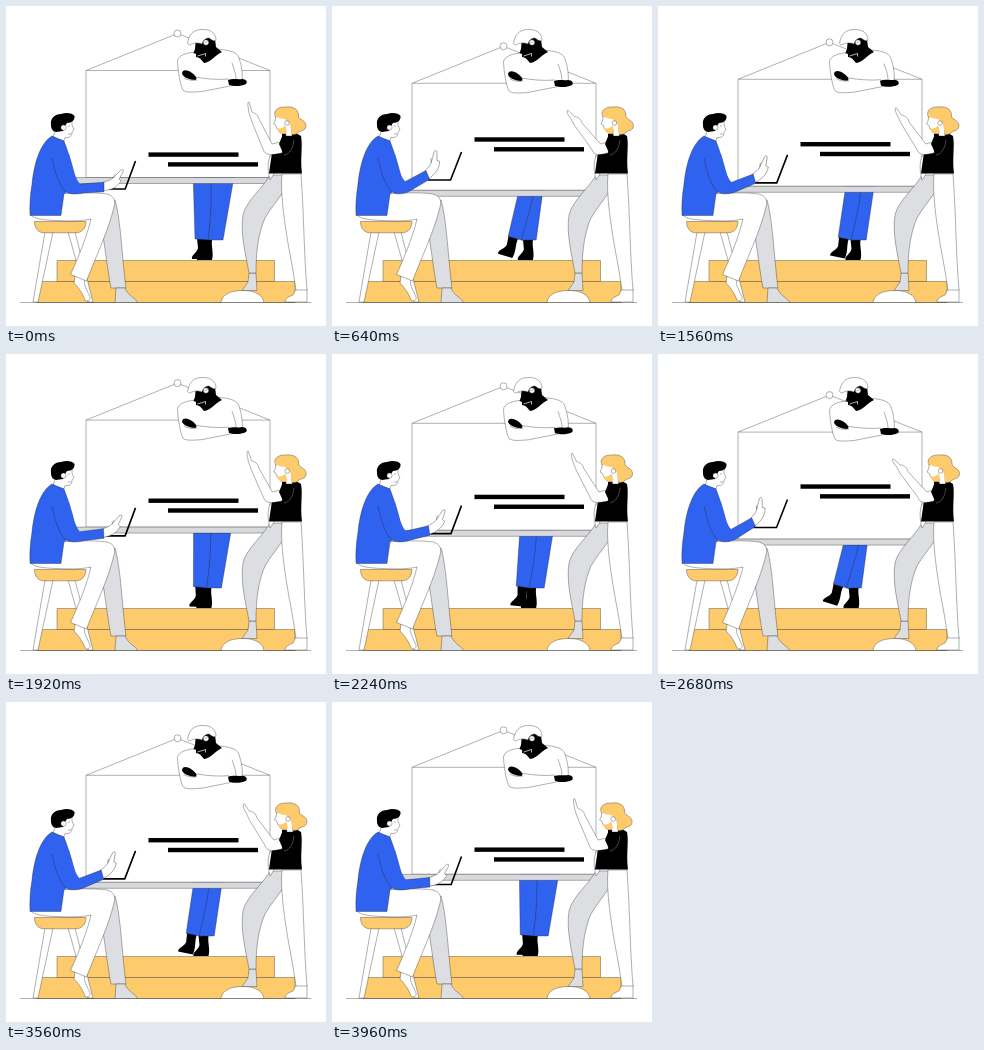
An HTML page with a canvas that plays this animation: 320x320 px, repeating every 4 s.

```html
<!DOCTYPE html>
<html lang="en">
<head>
<meta charset="utf-8">
<title>Team at the board</title>
<style>
html, body { margin: 0; width: 100%; height: 100%; overflow: hidden; background: #fff; }
canvas { display: block; width: 100vw; height: 100vh; }
</style>
</head>
<body>
<canvas id="stage"></canvas>
<script>
const LOOP = 4000, SWING = 2000, TICK = 40, SIZE = 320;
const BLUE = '#2f62ee', YELLOW = '#fecb6c', GRAY = '#dddee2', BLACK = '#000', WHITE = '#fff';
const canvas = document.getElementById('stage');
const ctx = canvas.getContext('2d');

const mix = (a, b, u) => a + (b - a) * u;

function stroke(d, color, width) {
  ctx.strokeStyle = color;
  ctx.lineWidth = width;
  ctx.stroke(new Path2D(d));
}

function shape(d, fill, line = 0.36) {
  if (fill) { ctx.fillStyle = fill; ctx.fill(new Path2D(d)); }
  if (line) stroke(d, '#222', line);
}

function ball(x, y, r, fill) {
  shape(`M${x - r} ${y}a${r} ${r} 0 1 1 ${2 * r} 0a${r} ${r} 0 1 1 ${-2 * r} 0Z`, fill);
}

function shifted(x, y, angle, draw) {
  ctx.save();
  ctx.translate(x, y);
  ctx.rotate(angle);
  draw();
  ctx.restore();
}

function steps() {
  shape('M51 254.5H268.5V275.5H51Z', YELLOW);
  shape('M31 275.5H289V296.5H31Z', YELLOW);
  shape('M14 296.5H305');
}

function shoe(x, y, tilt) {
  shifted(x, y, tilt, () => shape('M-4 -1L6 0C5 7 8 13 6 20L-9 20C-10 16 -4 14 -3 9Z', BLACK, 0));
}

// Legs showing under the board: one stands, the other swings out.
function standingLegs(u) {
  const hipL = 187 + 7 * u, hipR = 229 - 24 * u;
  const cuffL = 189 - 20 * u, cuffR = 217 - 20 * u;
  shoe(cuffL + 6 - 3 * u, 233 - 3 * u, 0.45 * u);
  shoe(200 - 8 * u, 234, 0);
  shape(`M${hipL} 165L${cuffL} ${233 - 4 * u}L${cuffL + 14 + 3 * u} ${234 + u}L${hipL + 21} 165Z`, BLUE);
  shape(`M${hipL + 17 - 3 * u} 165Q${mix(207, 196, u)} 200 ${cuffR - 15} 234L${cuffR} 234L${hipR} 165Z`, BLUE);
}

function board(u) {
  const y = 64.5 + 20 * u;
  shape(`M80 ${y}L169 ${y - 36}M174 ${y - 36}L264 ${y}`);
  ball(171.5, y - 37, 3.5, WHITE);
  shape(`M80 ${y}H264V${y + 107}H80Z`, WHITE);
  shape(`M68 ${y + 107}H267V${y + 113}H68Z`, '#d8d9dc');
  const bar = 146.4 - 23.6 * u;
  ctx.fillStyle = BLACK;
  ctx.fillRect(142.5, bar, 90, 4.4);
  ctx.fillRect(162, bar + 9.8, 90, 4.4);
}

function leaningMan(u) {
  shifted(0, 1.5 * u, 0, () => {
    shape('M192 46C182 46 172 49 171.500 55C172 65 174 78 177 84C180 87 188 86 196 85.500L224 80L236 77C237 70 236 60 233 52C231 45 221 44 210 43Z', WHITE);
    shape('M189 71C200 73 212 74 223 73M178 72C182 74 186 75 191 74M226 57C228 63 230 68 230 73');
    shape('M176 67C177 63 182 64 186 67C190 70 192 73 189 74C184 74 176 71 176 67Z', BLACK, 0);
    shape('M222 74C227 72 232 74 236 73C240 73 242 76 240 78C234 81 227 80 223 79Z', BLACK, 0);
  });
  shape('M189.500 37L189 43L187.500 47L190 48L190 51C193 51 195 53 198 57C205 56 208 50 216 46L210 41L209 33L197 31Z', BLACK, 0);
  shape('M182 35C184 27 189 23.500 196 23.500C204 23 210 27 210 34C208 36 206 34 203 32C199 32 197 35 196 38C191 36 187 37 184 39C182 39 181 37 182 35Z', WHITE);
  ball(200, 36.5, 2.7, WHITE);
  shape('M198.500 37L201.500 35.500');
  stroke('M191.500 50L199.500 47.500V50.500', WHITE, 0.7);
}

function laptop(u) {
  const y = 183 - 14 * u;
  stroke(`M${mix(99, 94, u)} ${y}H${119.2 - u}L129.500 ${y - 28}`, BLACK, 1.6);
}

function stool() {
  shape('M39 226L27 296H32L47 226Z', WHITE);
  shape('M62 226L82 296H87L69 226Z', WHITE);
  shape('M28.500 215.500H80C80 222 76 226.800 70 226.800H38C32 226.800 28.500 222 28.500 215.500Z', YELLOW);
}

function seatedMan(u) {
  shape('M92 205C98 228 100 256 105 282H120C116 252 115 215 109 194Z', GRAY);
  shape('M110 282L109 296.500H131.500C130 292 123 291 119 282Z', GRAY);
  shape('M69 270L68 277C73 282 77 288 79 294C82 297 85 293 84 291L79 280L78 272Z', WHITE);
  shape('M52 188C68 187 87 186 101 188C108 190 110 195 108 201C102 226 90 250 80.500 275L64.500 268.500C73 250 81 230 85 213C74 215.500 62 215 50 214.500C38 214 28 213 25 209Z', WHITE);

  shape('M50 122L47 132L58 135L59 131.500C64 132 66 130 66 126L68 124L66 119L66 114L56 112Z', WHITE);
  shape('M45 119C44 112 49 108 55 108C60 106 67 107 68.500 110C69 114 66 117 61 117L59 120L57 125L50 126C46 125 45 122 45 119Z', BLACK, 0);
  ball(57.5, 121.5, 2.6, WHITE);
  shape('M62 120L64 120M62 128L65 128');

  shape('M46 130C34 137 28 158 26 178C24 190 23.500 200 24 209.500H55L58 188L70 178C68 162 62 146 58 135Z', BLUE);

  // Forearm and hand lift together as the laptop rises.
  const x = mix(98, 94.5, u), y = mix(181, 162, u);
  shifted(x, y, -0.8 * u, () => {
    shape('M-2 -4C3 -6 7 -7 9 -9L17 -17C19 -18 20 -17 19 -15L15 -8L17 -6C14 -1 9 2 4 3L-1 4Z', WHITE);
    shape('M9 -9L11 -13');
  });
  const dx = 4.8 * Math.sin(0.6 * u), dy = 4.8 * Math.cos(0.6 * u);
  const sleeve = `M46 152C49 166 53 180 60 186C65 189 72 188 78 ${mix(187, 184, u)}L${x + dx} ${y + dy}L${x - dx} ${y - dy}L${mix(74, 73, u)} ${mix(178, 174, u)}`;
  shape(sleeve + 'C69 172 66 160 63 148Z', BLUE, 0);
  shape(sleeve);
}

function womanHead() {
  shape('M269 110C267 104 273 100.500 280 101C288 100 293 104 292.500 110C293 114 300 114 300 119.500C300 126 293 124 292 127C288 130 281 129 277 127.500C272 127 271 123 274 119Z', YELLOW);
  shape('M270 110L269 115L267.500 118L270 119.500L271 123C274 124.500 277 123 279 121L280 130H286L285 116L281 110Z', WHITE);
  shape('M270.500 122C274 123.500 277 122 279 119.500L281 126C278 129 272 127 270.500 122Z', YELLOW, 0);
  shape('M269 110C269 103 279 101 285 106L290 118C288 123 290 127 286 128L284 118L279 113C276 113 272 112 269 110Z', YELLOW, 0);
  ball(281, 117, 2.3, WHITE);
}

function pointingWoman(u) {
  shape('M215 296.500C216 288 225 284.500 237 284.500C249 284.500 257 289 258 296.500Z', WHITE);
  shape('M243 267L242 276L236 284.500H251L250 267Z', GRAY);
  shape('M264 169C257 182 240 195 237 209C234 228 240 250 243 267H250C250 247 252 228 259 212C264 203 272 194 277 186L280 169Z', GRAY);
  shape('M290 283L287 289C282 291 279 293 279 296H301V283Z', WHITE);
  shape('M276 168C274 188 279 220 283 243C286 258 288 271 290 284H301C298 250 298 210 295 168Z', WHITE);
  shape('M264 150C261 158 262 166 264 174L268 168V150Z', WHITE);
  shape('M276 128C282 126 290 126 295 130C297 140 294 152 296 167.500H263C264 160 265 153 266 147L276 140Z', BLACK, 0);

  shifted(2.2 * u, 0, 0, womanHead);

  const tipX = 243 - 10.7 * u, tipY = 96 + 13 * u;
  const wristX = 248 - 5 * u, wristY = 116 + 6 * u;
  const elbowX = 259 + 4 * u;
  shape(`M${tipX} ${tipY}C${tipX - 2} ${tipY} ${tipX - 1} ${tipY + 4} ${mix(243, 236, u)} ${mix(107, 115, u)}L${wristX - 2} ${wristY}L${elbowX - 2} 143C${elbowX} 150 ${elbowX + 6} 149 276 147L278 135L${elbowX + 7} 138L${wristX + 5} ${wristY - 3}C${wristX + 4} ${wristY - 8} ${wristX} ${wristY - 9} ${mix(246, 240, u)} ${mix(106, 113, u)}Z`, WHITE);
  shape('M277 128L273 138L278 149C284 148 287 142 288 135Z', BLACK, 0);
  stroke('M288 134C287 142 284 148 278 149', '#aaa', 0.4);
}

function frame(now) {
  const t = Math.floor((now % LOOP) / TICK) * TICK;
  const u = 1 - Math.abs(1 - (t % SWING) / (SWING / 2));
  const ratio = devicePixelRatio || 1;
  const w = Math.round(innerWidth * ratio), h = Math.round(innerHeight * ratio);
  if (canvas.width !== w || canvas.height !== h) { canvas.width = w; canvas.height = h; }
  ctx.setTransform(w / SIZE, 0, 0, h / SIZE, 0, 0);
  ctx.lineJoin = 'round';
  ctx.fillStyle = WHITE;
  ctx.fillRect(0, 0, SIZE, SIZE);
  steps();
  standingLegs(u);
  board(u);
  leaningMan(u);
  laptop(u);
  stool();
  seatedMan(u);
  pointingWoman(u);
}

const start = performance.now();
function loop() {
  frame(performance.now() - start);
  requestAnimationFrame(loop);
}
loop();
</script>
</body>
</html>
```
